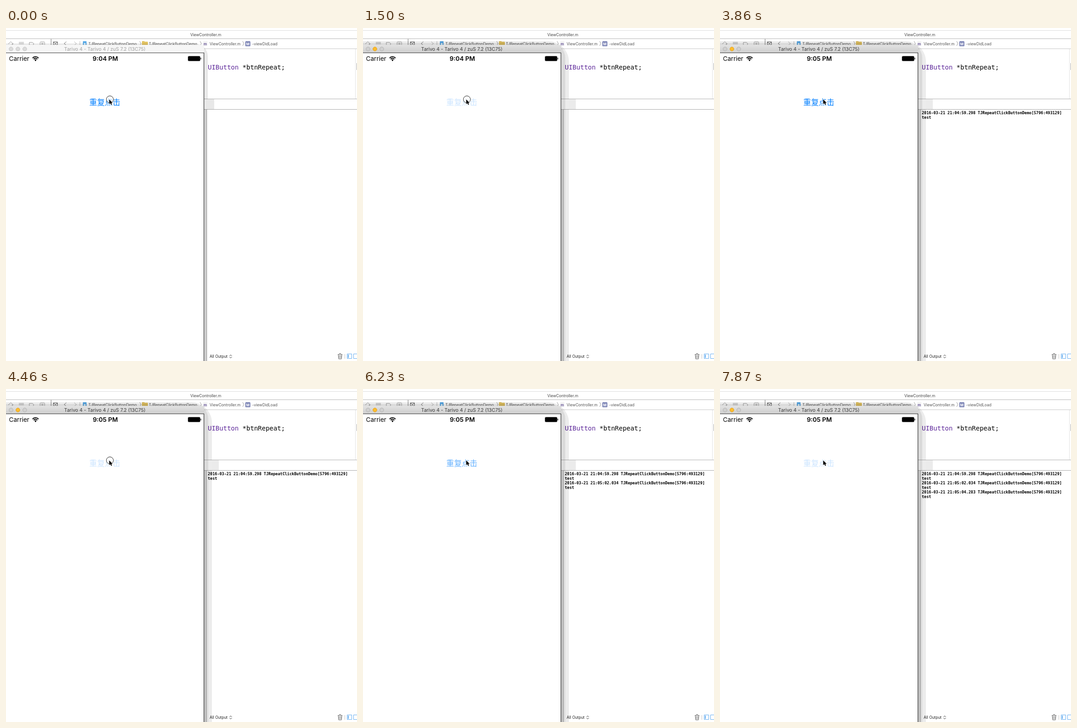
An HTML page with a canvas for the animation above (8000 ms loop, 767 by 730 pixels).

```html
<!DOCTYPE html>
<html lang="en">
<head>
<meta charset="utf-8">
<title>Repeat click demo</title>
<style>
html, body { margin: 0; width: 100%; height: 100%; overflow: hidden; background: #fff; }
canvas { display: block; width: 767px; height: 730px; }
</style>
</head>
<body>
<canvas id="stage" width="767" height="730"></canvas>
<script>
const ctx = document.getElementById('stage').getContext('2d');
const LOOP = 8000, STEP = 145, DIM = 0.2;
const UI = 'Inter, "Liberation Sans", sans-serif';
const MONO = '"DejaVu Sans Mono", monospace';
const CJK = '"Noto Sans CJK SC", "Noto Sans CJK", sans-serif';
const SMALL = `8.4px ${UI}`;

const ACTIVATE = 1350, MINUTE = 2530;

// press: ring shows, dim: label fades, release: label recovers from the given alpha
const clicks = [
  [1350, 1500, 1800, 0.45],
  [2380, 2530, 2830, 0.45],
  [3270, 3410, 3560, 0.45],
  [4310, 4460, 4600, 0.45],
  [5350, 5350, 5490, 0.4],
  [5930, 5930, 6230, 0.6],
  [6680, 6680, 6820, 0.45],
  [7270, 7270, 7420, 0.45],
  [7720, 7720, 7870, 0.2],
].map(([press, dim, release, start]) => ({ press, dim, release, start }));

const logs = [
  [1800, '21:04:59.298'],
  [4600, '21:05:02.034'],
  [6820, '21:05:04.283'],
];

function buttonState(t) {
  const click = clicks.filter(c => c.press <= t).pop();
  if (!click) return { ring: t < 150, alpha: 1 };
  const ring = t < click.release;
  if (t < click.dim) return { ring, alpha: 1 };
  if (ring) return { ring, alpha: DIM };
  const steps = Math.floor((t - click.release + 10) / STEP);
  return { ring, alpha: Math.min(1, click.start + steps * 0.3) };
}

function rect(x, y, w, h, color) {
  ctx.fillStyle = color;
  ctx.fillRect(x, y, w, h);
}

function text(str, x, y, font, color, align = 'left') {
  ctx.font = font;
  ctx.fillStyle = color;
  ctx.textAlign = align;
  ctx.fillText(str, x, y);
}

function line(points, color, width = 1, closed = false) {
  ctx.beginPath();
  points.forEach(([x, y]) => ctx.lineTo(x, y));
  if (closed) ctx.closePath();
  ctx.strokeStyle = color;
  ctx.lineWidth = width;
  ctx.stroke();
}

function box(x, y, w, h, r, fill, stroke) {
  ctx.beginPath();
  ctx.roundRect(x, y, w, h, r);
  if (fill) { ctx.fillStyle = fill; ctx.fill(); }
  if (stroke) { ctx.strokeStyle = stroke; ctx.lineWidth = 1; ctx.stroke(); }
}

function circle(x, y, r, fill, stroke, width = 1) {
  ctx.beginPath();
  ctx.arc(x, y, r, 0, Math.PI * 2);
  ctx.fillStyle = fill;
  ctx.fill();
  ctx.strokeStyle = stroke;
  ctx.lineWidth = width;
  ctx.stroke();
}

function chevron(x, y, w, h, color) {
  line([[x, y - h], [x + w, y], [x, y + h]], color);
}

function drawToolbar() {
  const gray = '#999', ink = '#555';
  rect(0, 5, 767, 1, '#dcdcdc');
  text('ViewController.m', 436.5, 18, SMALL, '#444', 'center');
  rect(0, 23, 767, 1, '#b4b4b4');
  rect(0, 45, 767, 1, '#c6c6c6');

  line([[5, 35], [10.5, 30], [16, 35], [13.5, 35], [13.5, 39]], gray);
  [31, 34, 37].forEach(y => rect(28, y, 11, 1, gray));
  line([[51, 31.5], [58, 31.5], [61, 35], [58, 38], [51, 38]], gray, 1, true);
  box(74.5, 30.5, 10, 7, 1, null, gray);
  rect(77, 33, 5, 1, gray);
  rect(77, 35, 5, 1, gray);
  rect(98, 24, 1, 14, '#777');

  box(103.5, 30.5, 9, 8, 0, null, ink);
  line([[104, 31], [112, 38]], ink);
  line([[112, 31], [104, 38]], ink);
  chevron(132, 34, -5, 4, '#777');
  chevron(149, 34, 5, 4, '#b5b5b5');
  rect(161, 29, 1, 10, '#bbb');

  const project = 'TJRepeatClickButtonDemo';
  box(168, 29, 8, 10, 1, '#58a9e6');
  rect(170, 33, 4, 4, '#d9eefb');
  text(project, 180, 38, SMALL, ink);
  chevron(292, 34, 3, 5, gray);
  box(297, 29, 6, 4, 1, '#d9b64f');
  box(297, 30, 13, 9, 1, '#e3c463');
  text(project, 312, 38, SMALL, ink);
  chevron(424, 34, 3, 5, gray);
  box(431, 28, 9, 11, 0, '#f5f5f5');
  text('m', 435.5, 38, `bold 8px ${UI}`, '#6a5a99', 'center');
  text('ViewController.m', 445, 38, SMALL, ink);
  chevron(517, 34, 3, 5, gray);
  box(523, 29, 11, 11, 1.5, '#7b83b5');
  text('M', 528.5, 37.5, `bold 8px ${UI}`, '#fff', 'center');
  text('-viewDidLoad', 538, 38, SMALL, ink);
}

function drawEditor() {
  const font = `14px ${MONO}`;
  text('UIButton', 441, 91, font, '#5c2699');
  text('*btnRepeat;', 441 + ctx.measureText('UIButton ').width, 91, font, '#000');
  rect(763, 46, 1, 109, '#e2e2e2');
  rect(766, 77, 1, 15, '#aaa');
  rect(433, 155, 334, 1, '#b0b0b0');
  rect(433, 178, 334, 1, '#a8a8a8');
}

function drawConsole(t) {
  const font = `bold 8.48px ${MONO}`;
  logs.forEach(([time, stamp], i) => {
    if (t < time) return;
    const y = 189 + i * 20;
    text(`2016-03-21 ${stamp} TJRepeatClickButtonDemo[5796:493129]`, 441, y, font, '#000');
    text('test', 441, y + 10, font, '#000');
  });

  text('All Output', 445, 723, SMALL, '#222');
  line([[488.5, 719], [491, 716.5], [493.5, 719]], '#333');
  line([[488.5, 721], [491, 723.5], [493.5, 721]], '#333');

  const gray = '#666';
  rect(725, 715, 10, 1, gray);
  rect(728, 713, 4, 1, gray);
  line([[726, 716], [727, 725.5], [733, 725.5], [734, 716]], gray);
  [728, 730, 732].forEach(x => rect(x - 0.3, 717, 0.7, 7, gray));
  rect(740, 715, 1, 10, '#c4c4c4');

  const blue = '#65adf0';
  box(745.5, 714.5, 10, 10, 0, '#fff', blue);
  rect(747, 716, 2, 7, blue);
  box(759.5, 714.5, 10, 10, 0, '#fff', blue);
}

function drawShadow(active) {
  const shade = (right, top, r, alpha) =>
    box(-60, top, right + 60, 800, r, `rgba(0,0,0,${alpha})`);
  if (active) {
    shade(450, 29, 45, 0.075);
    shade(442, 33, 32, 0.075);
    rect(450, 156, 15, 22, '#ebebeb');
  } else {
    shade(441, 34, 28, 0.09);
    rect(441, 156, 14, 22, '#e8e8e8');
  }
  rect(433, 179, 3, 551, active ? '#c2c2c2' : '#d4d4d4');
  rect(437, 179, 1, 551, '#777');
}

function drawTitleBar(active) {
  const fill = ctx.createLinearGradient(0, 37, 0, 54);
  fill.addColorStop(0, active ? '#e2e2e2' : '#f6f6f6');
  fill.addColorStop(1, active ? '#cecece' : '#f6f6f6');
  box(0, 37, 433, 18, [0, 4, 0, 0], fill);
  const off = active ? ['#d0d0d0', '#b2b2b2'] : ['#dcdcdc', '#c6c6c6'];
  circle(11, 46, 4.3, ...off);
  circle(26, 46, 4.3, ...(active ? ['#fdbd2f', '#dfa023'] : off));
  circle(41, 46, 4.3, ...off);
  text('Tarivo 4 - Tarivo 4 / zuS 7.2 (13C75)', 216, 50, `10.5px ${UI}`,
    active ? '#3a3a3a' : '#a0a0a0', 'center');
}

function drawStatusBar(t) {
  text('Carrier', 6.5, 72, `13.6px ${UI}`, '#000');
  text(t < MINUTE ? '9:04 PM' : '9:05 PM', 217, 72, `600 13.5px ${UI}`, '#000', 'center');

  ctx.strokeStyle = '#000';
  ctx.lineWidth = 2;
  [5.5, 9].forEach(r => {
    ctx.beginPath();
    ctx.arc(64.5, 72, r, -Math.PI * 0.76, -Math.PI * 0.24);
    ctx.stroke();
  });
  ctx.beginPath();
  ctx.moveTo(64.5, 73);
  ctx.arc(64.5, 72, 3, -Math.PI * 0.76, -Math.PI * 0.24);
  ctx.fillStyle = '#000';
  ctx.fill();

  box(397.5, 61.5, 27, 11, 2, '#fff', '#999');
  box(398, 62, 26, 10, 1.5, '#000');
  box(425, 65, 1.5, 4, 1, '#333');
}

function drawPointer(ring) {
  if (ring) circle(227, 156.5, 7.7, 'rgba(255,255,255,0.6)', '#222');
  const arrow = [[225.5, 156.5], [225.5, 167], [228, 164.8], [229.8, 168.5],
    [231.6, 167.6], [230, 164.2], [233, 164]];
  line(arrow, '#fff', 1.6, true);
  ctx.fillStyle = '#000';
  ctx.fill();
}

function drawSimulator(t, active) {
  drawShadow(active);
  rect(0, 55, 432, 675, '#fff');
  drawTitleBar(active);
  rect(0, 54, 433, 1, '#333');
  rect(432, 54, 1, 676, '#111');
  drawStatusBar(t);

  const { ring, alpha } = buttonState(t);
  ctx.globalAlpha = alpha;
  text('重复点击', 216, 169, `300 17px ${CJK}`, '#007fff', 'center');
  ctx.globalAlpha = 1;
  drawPointer(ring);
}

function draw(t) {
  rect(0, 0, 767, 730, '#fff');
  drawToolbar();
  drawEditor();
  drawConsole(t);
  drawSimulator(t, t >= ACTIVATE);
}

function tick() {
  draw(performance.now() % LOOP);
  requestAnimationFrame(tick);
}
tick();
</script>
</body>
</html>
```
